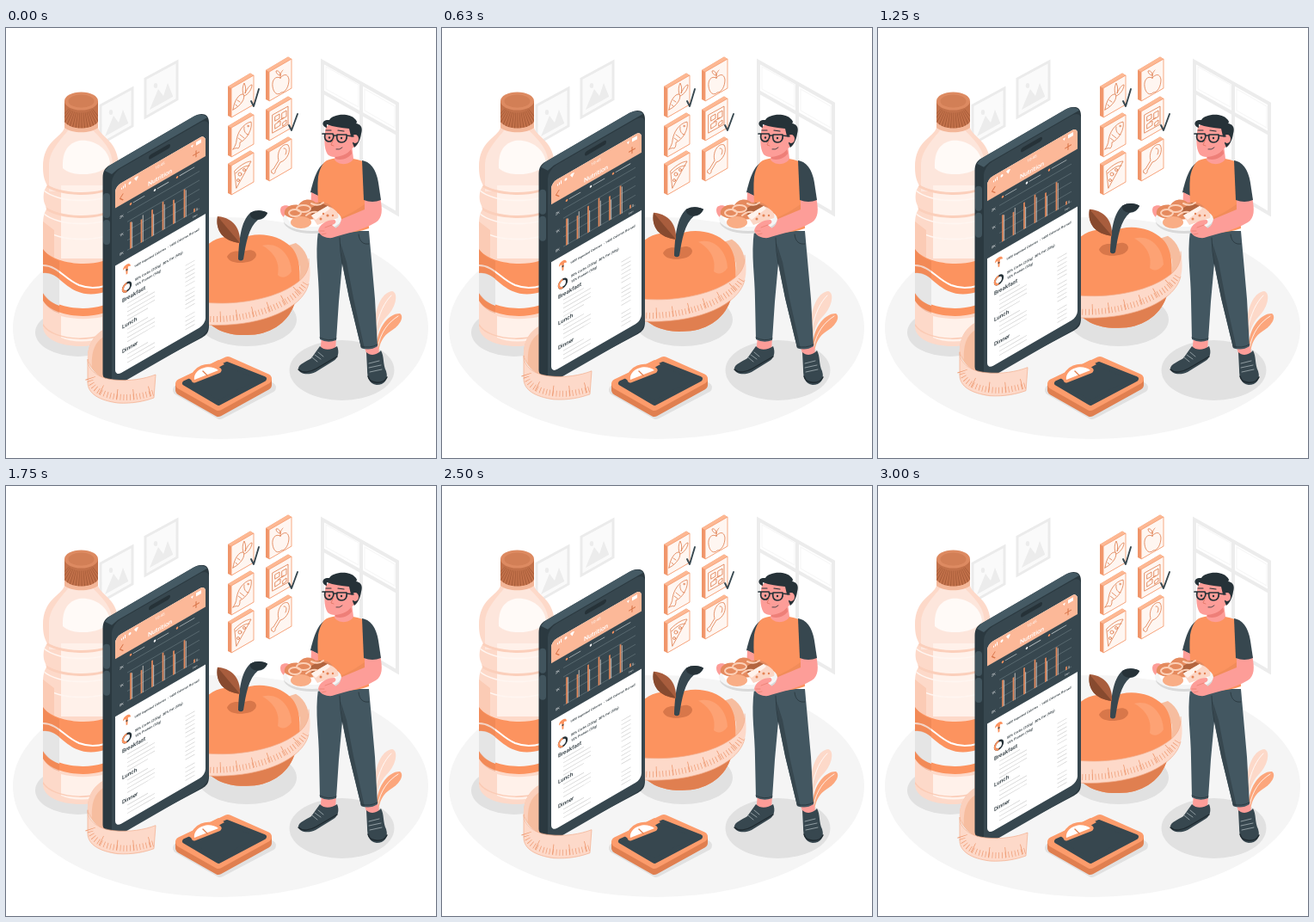
An HTML page for the animation above (3.04 s loop, 500 by 500 pixels).

```html
<!DOCTYPE html>
<html lang="en">
<head>
<meta charset="utf-8">
<title>Nutrition</title>
<style>
html, body { margin: 0; width: 100%; height: 100%; overflow: hidden; background: #fff; }
svg { display: block; width: 100vw; height: 100vh; }
text { font-family: Roboto, Inter, sans-serif; }
/* 1.5 s up, 1.5 s down at 24 steps a second, then a 40 ms rest */
.float { animation: float 3040ms steps(36) infinite; }
@keyframes float {
  0%, 98.684%, 100% { transform: translateY(0); }
  49.342% { transform: translateY(-10px); }
}
.o { fill: #fc935f; }
.od { fill: #e07f50; }
.p { fill: #fdd9c9; }
.d { fill: #263238; }
.s { fill: #37474f; }
.skin { fill: #fd9d98; }
.w { fill: #fff; }
.shade { fill: #e1e1e1; }
.line { fill: none; stroke-linecap: round; stroke-linejoin: round; }
.icon { fill: none; stroke: #df7b4c; stroke-width: .8; stroke-linejoin: round; stroke-linecap: round; }
.tick { fill: none; stroke: #ee9a72; }
.edge { fill: none; stroke: #f3ad8b; stroke-width: .7; }
.wall { fill: none; stroke: #ececec; }
.rule { fill: none; stroke: #d8d8d8; stroke-dasharray: .9 3.9; }
</style>
</head>
<body>
<svg viewBox="0 0 500 500">
<defs>
  <g id="board">
    <path d="M-4-2 22-17.500 26-15V19L0 34-4 32Z" fill="#f0956a"/>
    <path d="M-4-2 22-17.500 26-15 0 0Z" fill="#fdb893"/>
    <path d="M0 0 26-15V19L0 34Z" fill="#fff6f1" stroke="#f6a178" stroke-width=".9" stroke-linejoin="round"/>
  </g>
  <g id="picture">
    <path d="M0 0 37-20V24L0 45Z" fill="#fafafa" stroke="#ebebeb" stroke-width="3"/>
    <path d="M5 36 15 12 21 20 26 5 32 20V21Z" fill="#ececec"/>
    <ellipse cx="12" cy="8" rx="2.2" ry="3" fill="#ececec"/>
  </g>
  <clipPath id="screen"><rect y="184" width="105" height="221" rx="7"/></clipPath>
  <path id="bottle" d="M68 106V116C64 128 43 131 43 162 43 172 45 178 48 183 44 188 43 194 44 201 45 206 47 207 47 211 43 217 43 224 43 232V347C43 361 62 370 87 370S131 361 131 347V232C131 224 131 217 127 211 127 207 129 206 130 201 131 194 130 188 126 183 129 178 131 172 131 162 131 131 111 128 107 116V106Z"/>
  <clipPath id="bottleClip"><use href="#bottle"/></clipPath>
  <path id="cap" d="M68 85V109C75 119 100 119 107 109V85Z"/>
  <clipPath id="capClip"><use href="#cap"/></clipPath>
  <path id="apple" d="M225 263C236 245 255 239 273 245 291 236 317 240 331 254 344 267 345 296 335 322 327 344 306 357 280 357 257 358 237 350 225 330Z"/>
  <clipPath id="appleClip"><use href="#apple"/></clipPath>
</defs>

<ellipse cx="249.500" cy="349" rx="241.500" ry="129" fill="#f5f5f5"/>

<!-- wall -->
<use href="#picture" x="110" y="90"/>
<use href="#picture" x="162" y="59"/>
<path class="wall" stroke-width="4" d="M368 39 455 88V216L368 165Z"/>
<path class="wall" stroke-width="4" d="M413 64V190M368 74 455 123"/>
<path fill="none" stroke="#f7f7f7" stroke-width="1.200" d="M372 45 410 66V92L372 71ZM417 71 452 91V116L417 96Z"/>
<use href="#board" x="262" y="70"/>
<use href="#board" x="306" y="51"/>
<use href="#board" x="262" y="116"/>
<use href="#board" x="306" y="97"/>
<use href="#board" x="262" y="160"/>
<use href="#board" x="306" y="144"/>
<g class="icon">
  <path d="M264 95C265 85 271 76 276 77 279 81 273 91 264 95ZM276 77C274 71 276 66 277 64 279 68 279 72 278 76 281 69 284 66 286 66 286 71 282 77 277 79M269 84 272 86M267 89 269 91"/>
  <path d="M319 58C313 55 309 61 310 68 311 76 316 79 320 75 325 75 329 68 329 60 328 53 323 53 319 58ZM319 58C319 53 320 51 322 49M319 55C315 55 314 51 314 50 317 49 319 52 319 55"/>
  <path d="M264 141C266 138 268 134 268 131 269 121 276 111 285 109 287 117 280 130 272 133 272 136 272 138 270 140 268 139 266 140 264 141ZM277 115C276 120 279 124 282 124M272 124 277 128M270 128 274 131"/>
  <circle cx="281.500" cy="114" r=".8"/>
  <path d="M310 101 328 91V112L310 122ZM313 103 318 100V105L313 108ZM321 99 326 96V103L321 106ZM313 112 319 108V113L313 117ZM322 110 326 107V111L322 114ZM316 109 323 104"/>
  <path d="M266 166C274 158 281 155 285 155L268 186ZM267 169C274 162 279 160 283 160"/>
  <circle cx="272" cy="170" r="2"/><circle cx="277" cy="165" r="1.500"/><circle cx="270" cy="177" r="1.500"/>
  <path d="M309 168C307 165 311 164 311 164L317 154C314 144 322 133 328 136 332 142 327 154 319 156L313 166C314 169 310 171 309 168ZM323 140C326 139 327 143 325 147"/>
</g>
<path class="line" stroke="#37474f" stroke-width="1.900" d="M285 85 288 91 294 71M329 113 332 119 339 100"/>

<!-- ground shadows -->
<ellipse class="shade" cx="84" cy="354" rx="50" ry="28"/>
<ellipse class="shade" cx="280" cy="339" rx="58" ry="31"/>
<ellipse class="shade" cx="390.500" cy="398" rx="61" ry="35"/>
<path fill="#e1e1e1" stroke="#e1e1e1" stroke-width="12" stroke-linejoin="round" d="M200 421 258 393 308 418 249 449Z"/>

<!-- bottle -->
<use href="#bottle" class="p"/>
<g clip-path="url(#bottleClip)">
  <path fill="#fde6dc" d="M50 190V160C50 143 62 132 73 118H100C114 132 124 142 124 160V190Z"/>
  <path fill="#fffaf7" d="M66 163C65 144 72 134 85 131 101 129 119 139 121 157 114 171 79 175 66 163Z"/>
  <path fill="#fff1ea" d="M64 183H118V268H64Z"/>
  <path class="line" stroke="#fbcfbb" stroke-width="3" d="M43 180C60 196 110 197 131 181M43 207C60 223 110 224 131 208"/>
  <path class="line" stroke="#fff6f1" stroke-width="1.500" d="M43 188C60 204 110 205 131 189M43 215C60 231 110 232 131 216M43 233C60 249 110 250 131 234"/>
  <path fill="#fbcbb5" d="M43 225V260C48 266 52 267 56 268V235Z"/>
  <path class="o" d="M43 257C55 276 112 282 131 260V321C112 342 55 338 43 317Z"/>
  <path fill="#f5f5f5" d="M43 285C59 284 66 299 82 306 98 313 115 309 131 299V312C112 333 55 329 43 308Z"/>
  <path class="line" stroke="#fff" stroke-width="2" d="M43 276C60 276 68 292 85 299 101 305 117 301 131 292"/>
  <path fill="#e5e5e5" d="M43 285C51 284 57 288 62 292V323C51 319 46 314 43 308Z"/>
  <path fill="#d97345" opacity=".3" d="M43 257C49 265 54 268 62 271V292C56 287 51 285 43 285ZM43 308C49 316 54 320 62 323V332C53 329 47 324 43 317Z"/>
  <path fill="#fff1ea" d="M64 335C80 339 96 339 112 336V360C98 366 77 366 64 360Z"/>
  <path class="line" stroke="#fbcbb5" stroke-width="1.500" d="M43 345C55 365 112 368 131 345"/>
</g>
<path fill="#f3b698" d="M68 106H107V116C98 123 77 123 68 116Z"/>
<use href="#cap" fill="#c2714a"/>
<path clip-path="url(#capClip)" fill="none" stroke="#a45a37" stroke-width="18" stroke-dasharray=".8 2" d="M67 100C77 110 98 110 108 100"/>
<ellipse fill="#dd8a61" cx="87.500" cy="85" rx="19.500" ry="10.500"/>
<ellipse fill="#d27f56" cx="87.500" cy="85" rx="15" ry="7.500"/>

<g class="float">
  <!-- apple -->
  <path fill="#f6bd9f" d="M325 254 337 250C349 257 354 271 352 286L338 303C345 285 345 270 325 254Z"/>
  <use href="#apple" class="o"/>
  <g clip-path="url(#appleClip)">
    <path class="od" d="M225 337C270 349 316 339 345 309V360H225Z"/>
    <path fill="#fda274" d="M298 253C315 248 331 262 332 283 328 290 320 292 316 287 319 272 311 260 298 253Z"/>
  </g>
  <path fill="#d8774a" d="M257 266C260 259 269 258 275 261 282 256 291 258 291 264 290 271 280 273 272 273 265 273 259 271 257 266Z"/>
  <path class="s" d="M270 269C271 246 273 225 284 215 291 211 299 212 304 215 302 220 298 223 293 223 282 232 279 250 276 269 274 271 272 271 270 269Z"/>
  <path class="d" d="M284 215C291 211 299 212 304 215 302 220 297 222 292 223 286 222 283 219 284 215Z"/>
  <path fill="#a85d3d" d="M272 250C253 248 243 236 246 219 260 220 273 229 272 250Z"/>
  <path fill="#874a2f" d="M272 250C253 248 243 236 246 219 254 229 263 239 272 250Z"/>
  <path class="p" d="M230 319C268 323 312 315 336 298 348 290 353 281 352 268 354 280 354 290 352 297 345 328 292 349 230 345Z"/>
  <path class="edge" d="M230 319C268 323 312 315 336 298 348 290 353 281 352 268M230 345C292 349 345 328 352 297"/>
  <path class="tick" stroke-width="7" stroke-dasharray=".7 3.100" d="M230 338C272 342 332 325 348 297"/>
  <path class="tick" stroke-width="12" stroke-dasharray=".8 18.200" d="M230 335C272 339 332 322 347 294"/>

  <path fill="#f6bd9f" d="M95 386C94 368 103 356 115 350V408C106 404 98 397 95 386Z"/>
  <path fill="#fbd0bc" d="M95 386C94 368 103 356 115 350V358C105 364 99 373 100 394Z"/>

  <!-- phone -->
  <path fill="#2b3940" d="M112.500 174C112.500 166 116 162 120 160L218 103C227 98 236 99 236 110V346C236 354 233 357 228 360L136 409C126 412 112.500 412 112.500 402Z"/>
  <path fill="#455a64" d="M115 166 120 160 218 103C224 100 230 100 234 104L130 164 123 170Z"/>
  <rect x="113" y="192" width="8" height="29" rx="4" fill="#41545d"/>
  <rect x="113" y="223" width="8" height="29" rx="4" fill="#41545d"/>
  <g transform="matrix(1 -.577 0 1 127 0)">
    <rect class="s" x="-4" y="167" width="113" height="250" rx="10"/>
    <rect class="d" x="39" y="171" width="25" height="5" rx="2.500"/>
    <g clip-path="url(#screen)">
      <rect class="w" y="184" width="105" height="222"/>
      <rect fill="#fcb898" y="184" width="105" height="26"/>
      <rect class="s" y="209.500" width="105" height="67"/>
    </g>
    <g class="w" text-anchor="middle">
      <text x="52" y="191.500" font-size="4.500">10:45</text>
      <text x="52" y="206" font-size="7.200" font-weight="500">Nutrition</text>
      <path d="M7 192V190H8V192ZM9 192V189H10V192ZM11 192V188H12V192Z"/>
      <circle cx="17" cy="190" r="1.500"/>
      <path d="M22 188Q24.500 186 27 188L24.500 192Z"/>
      <path d="M88 188H91L89.500 191ZM94 187H100V191H94Z"/>
    </g>
    <path class="line" stroke="#d9754a" stroke-width="1.100" d="M9 198 5.500 201.500 9 205M94 197V204M90.500 200.500H97.500"/>
    <path class="line" stroke="#b9c0c3" stroke-width=".8" d="M21 215H34M49 215H62M75 215H92"/>
    <circle class="o" cx="18" cy="215" r="1.300"/><circle class="w" cx="46" cy="215" r="1.300"/><circle class="o" cx="72" cy="215" r="1.300"/>
    <path fill="none" stroke="#708087" stroke-width=".5" d="M14 223H98M14 233.500H98M14 244H98M14 255H98M14 266.500H98"/>
    <g class="w" font-size="4"><text x="5" y="225">2K</text><text x="5" y="246">1K</text><text x="5" y="268">0K</text></g>
    <path fill="none" stroke="#e78a5c" stroke-width="1.700" d="M18 267V236M30.500 267V240M43 267V236M55.500 267V234M68 267V239M80.500 267V234M92 267V263"/>
    <path fill="none" stroke="#dfd6d0" stroke-width=".8" d="M19.700 267V237M32.200 267V236M44.700 267V242M57.200 267V238M69.700 267V244M82.200 267V236M95 267V264"/>
    <text x="90" y="273" font-size="2.600" fill="#fff">Days</text>
    <path class="o" d="M9 287A4.500 4.500 0 0 1 18 287L15 286 14.300 294H12.700L12 286Z"/>
    <circle class="s" cx="13.500" cy="289" r="1"/>
    <circle fill="none" stroke="#263238" stroke-width="2.200" cx="13.500" cy="309" r="4.600"/>
    <path fill="none" stroke="#fc935f" stroke-width="2.200" d="M13.500 304.400A4.600 4.600 0 0 0 13.500 313.600"/>
    <g class="d" font-weight="500">
      <text x="22" y="291.500" font-size="3.600">1400 Ingested Calories&#160; - 1400 Calories Burned</text>
      <text x="23" y="307.500" font-size="3.800"><tspan font-weight="700">50%</tspan> Carbs (200g)&#160; <tspan font-weight="700">30%</tspan> Fat (50g)</text>
      <text x="23" y="314" font-size="3.800"><tspan font-weight="700">15%</tspan> Protein (50g)</text>
      <g font-size="6.300">
        <text x="8" y="324">Breakfast</text><text x="8" y="354.500">Lunch</text><text x="8" y="383">Dinner</text>
      </g>
    </g>
    <path class="rule" stroke-width="24" d="M26 328V349M26 358V377M26 387V401"/>
    <path class="rule" stroke-width="8" d="M42 332.800V344M42 362.800V373M42 391.800V398"/>
    <path class="rule" stroke-width="11" d="M87 323V349M87 354V377M87 383V401"/>
  </g>

  <!-- loose tape, in front of the phone -->
  <path class="p" d="M95 385C95 398 107 407 125 409 144 411 161 408 174 403L172 430C161 434 147 437 130 436 108 433 95 425 95 412Z"/>
  <path class="edge" d="M95 385C95 398 107 407 125 409 144 411 161 408 174 403L172 430C161 434 147 437 130 436 108 433 95 425 95 412Z"/>
  <path class="tick" stroke-width="7" stroke-dasharray=".7 3.100" d="M98 410C101 420 113 427 130 429 147 431 161 427 172 424"/>
  <path class="tick" stroke-width="12" stroke-dasharray=".8 18.200" d="M98 407C101 417 113 424 130 426 147 428 161 424 172 421"/>
</g>

<!-- scale -->
<g stroke-width="12" stroke-linejoin="round">
  <path class="od" stroke="#e07f50" d="M203 421 258 395 303 415 247 446ZM203 414V421M303 408V415"/>
  <path fill="#fc9c6c" stroke="#fc9c6c" d="M203 414 258 388 303 408 247 439Z"/>
  <path class="s" stroke="#37474f" stroke-width="6" d="M208 413 257 391 300 408 247 436Z"/>
  <path fill="#fc9c6c" d="M209 405 247 386 254 391 218 411Z"/>
  <path class="w" stroke="#fc9c6c" stroke-width="7" paint-order="stroke" d="M219 409C217 397 236 389 247 398Z"/>
</g>
<path class="line" stroke="#e07f50" stroke-width="1.300" d="M229 399 234 404"/>

<!-- plant -->
<path class="p" d="M428 350C429 326 436 308 449 306 457 308 453 325 444 334 437 341 433 350 431 359Z"/>
<path fill="#fca67c" d="M430 378C430 351 443 332 458 332 464 336 457 347 448 352 438 358 434 367 433 378Z"/>
<path class="line" stroke="#fff" stroke-width=".8" d="M430 350C434 331 440 319 448 311M432 373C435 353 445 342 456 335"/>

<!-- man -->
<path class="skin" d="M367 358H384L383 378 365 381ZM416 368 432 367 435 384 421 385Z"/>
<path fill="#435761" d="M363 236C359 265 364 288 364 316L365 362Q374 367 384 363L387 318 391 274 399 314 413 372Q423 376 432 370L429 315 422 236Z"/>
<path class="s" d="M391 274 389 250 396 272 404 314 417 373 413 372 399 314Z"/>
<path class="line" stroke="#2b3940" stroke-width=".9" d="M388 244 389 260 391 274M410 240C411 249 416 252 422 251M365 360Q375 365 384 361M413 370Q423 373 432 368"/>
<g class="s">
  <path d="M365 370C371 376 379 374 385 370 388 377 386 384 381 387L360 400C352 404 341 403 340 396 340 391 349 388 355 384Z"/>
  <path d="M419 377C424 382 432 380 436 375 440 382 438 391 442 399 445 409 440 415 431 415 422 414 420 406 420 397Z"/>
</g>
<path class="line" stroke="#1f2a30" stroke-width="1.400" d="M340 397C345 402 354 400 361 396L385 382M421 405C423 414 439 415 443 406"/>
<path class="line" stroke="#9aa6ab" stroke-width=".9" d="M356 383 362 388M359 380 366 385M363 377 369 382M422 390 434 387M422 395 436 392M423 400 437 397"/>

<path class="s" d="M374 155C362 159 358 176 354 191L368 198 378 174Z"/>
<path class="skin" d="M355 191 367 197 365 214 354 215Z"/>
<path class="o" d="M373 154C382 150 402 150 415 155 425 165 423 186 421 203L422 233C404 240 379 239 363 234 365 211 361 193 363 173 365 163 368 157 373 154Z"/>
<path fill="#e58352" opacity=".45" d="M421 202C409 211 397 218 385 222V225C399 229 411 226 422 221Z"/>
<path class="skin" d="M383 137 402 136 404 152C400 160 386 160 382 153Z"/>
<path fill="#ee7f78" d="M383 147C391 150 397 146 401 141L402 146C397 153 389 154 383 152Z"/>
<path class="skin" d="M372 115C370 126 369 139 374 147 380 153 395 149 401 141L408 136C413 130 409 121 403 122L400 109 380 109Z"/>
<path class="d" d="M373 116C366 114 367 106 376 107 380 100 399 98 406 106 409 109 408 110 407 111 413 112 415 116 413 123 412 130 409 136 405 139L403 134 404 128 401 126 399 117C390 116 381 115 373 112Z"/>
<ellipse class="skin" cx="406" cy="129" rx="4" ry="5"/>
<g class="line" stroke="#263238">
  <path stroke-width="1.700" d="M371 123H380C382 126 380 132 376 132 371 132 370 128 371 123ZM385 124H396C397 129 395 133 390 133 385 133 384 128 385 124ZM381 125H385M396 125 404 126M371 123H368"/>
  <path stroke-width="1.200" d="M372 119 378 119M386 119 393 120"/>
  <path stroke-width=".8" d="M384 141Q388 142 391 139"/>
</g>
<circle class="d" cx="376" cy="127.500" r="1.200"/><circle class="d" cx="390" cy="128" r="1.200"/>
<path class="line" stroke="#e57c6c" stroke-width="1" d="M381 129 378 136 381 137"/>

<path class="skin" d="M417 198 435 197C438 211 438 221 430 226 413 236 394 239 379 244 372 245 366 240 362 235L371 226 386 224 417 211Z"/>
<path class="s" d="M414 154C426 156 431 168 433 180L436 200Q426 204 416 200Z"/>
<path class="skin" d="M320 208C325 204 332 207 334 212L326 222C321 220 317 213 320 208Z"/>
<ellipse fill="#d9d9d9" cx="356" cy="225" rx="33" ry="14"/>
<ellipse fill="#f5f5f5" cx="356" cy="222" rx="34" ry="14"/>
<ellipse class="w" cx="356" cy="220" rx="29" ry="11"/>
<path fill="#e58a5e" d="M324 217C322 209 332 204 340 206 345 198 355 198 360 203 370 201 380 205 381 213 375 222 337 228 324 217Z"/>
<path fill="#b3653f" d="M352 211 365 203 379 209 373 217 356 219Z"/>
<ellipse fill="#f9ad85" cx="343" cy="226" rx="12" ry="7"/>
<path fill="#fcd6c5" d="M355 218 374 207C383 210 388 216 386 221L362 229Z"/>
<path fill="#fff3ec" d="M355 218 374 207 377 210 360 223Z"/>
<g class="line" stroke="#fcd0b7" stroke-width="2">
  <ellipse cx="346" cy="210" rx="8" ry="4"/><ellipse cx="336" cy="215" rx="7" ry="4"/>
  <path d="M355 204Q363 208 369 203M349 218Q355 213 361 214"/>
</g>
<g fill="#e58457"><circle cx="366" cy="222" r="1.500"/><circle cx="374" cy="218" r="1.600"/><circle cx="380" cy="218" r="1.200"/><circle cx="369" cy="216" r="1.200"/></g>
<path class="skin" d="M363 236C364 229 372 223 382 223 385 225 383 228 379 229L386 235 377 244C370 244 365 241 363 236Z"/>
<path class="line" stroke="#e57c6c" stroke-width=".7" d="M379 229 371 232M365 236 370 236M367 240 372 239"/>
</svg>
</body>
</html>
```
